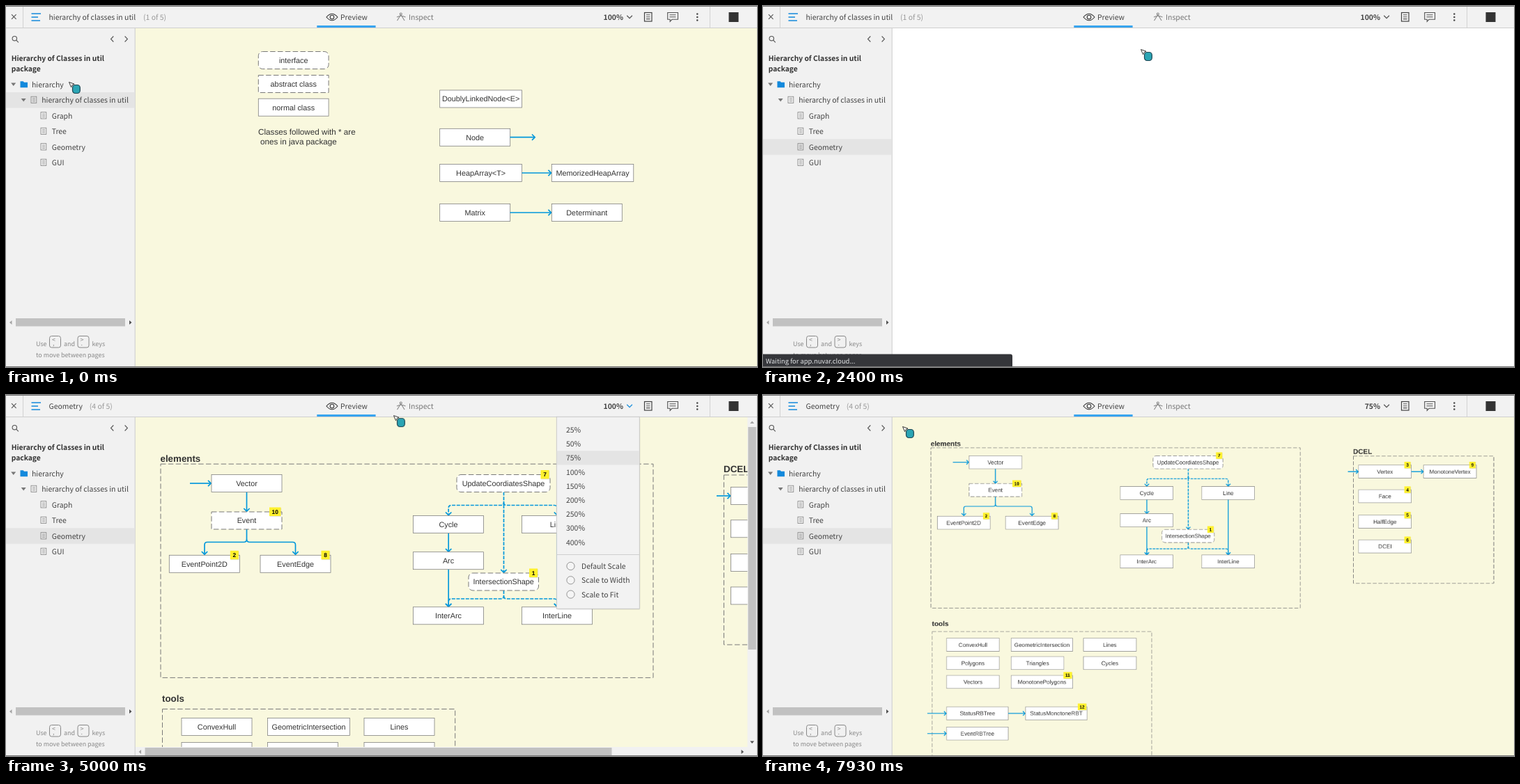
An HTML page for the animation above (8000 ms loop, 1078 px wide and 519 px high).

```html
<!DOCTYPE html>
<html lang="en">
<head>
<meta charset="utf-8">
<title>Class hierarchy viewer</title>
<style>
html, body { margin: 0; width: 100%; height: 100%; overflow: hidden; background: #f2f2f2; }
svg { display: block; width: 1078px; height: 519px; }
text { white-space: pre; text-rendering: geometricPrecision; }
.ui { font: 10.45px "Noto Sans CJK SC", "Noto Sans CJK JP", "Noto Sans CJK", "Open Sans", sans-serif; fill: #444; }
.strong { font-weight: 700; }
.heading { font-size: 10.3px; font-weight: 700; fill: #333; }
.hint { font-size: 8.95px; fill: #888; }
.status { font-size: 9.4px; fill: #e4e6e8; }
.soft { fill: #999; }
.label { font: 10.83px "Liberation Sans", Arial, sans-serif; fill: #333; text-anchor: middle; }
.group { font: bold 13.33px "Liberation Sans", Arial, sans-serif; fill: #333; }
.note { font: 11.7px "Liberation Sans", Arial, sans-serif; fill: #333; }
.count { font: bold 8.4px "Liberation Sans", Arial, sans-serif; text-anchor: middle; }
.icon, .ink { fill: none; stroke: #555; stroke-width: 1.1; }
.flow { fill: none; stroke: #0097db; stroke-width: 1.67; }

/* One loop is 8 s, so 1% is 80 ms. */
.home, .home-title, .geo, .status-bar, .hover, .menu, .pick, .full, .small, .selected, .zoom, .chevron {
  animation: 8s step-end infinite;
}
.home { animation-name: home; }
.home-title { animation-name: home-title; }
.geo { animation-name: geo; }
.status-bar { animation-name: status-bar; }
.hover { animation-name: hover; }
.menu { animation-name: menu; }
.pick { animation-name: pick; }
.full { animation-name: full; }
.small { animation-name: small; }
.selected { animation-name: selected; }
.zoom { animation-name: zoom; }
.chevron { animation-name: chevron; }
.cursor { animation: cursor 8s linear infinite; }

@keyframes home { 0% { opacity: 1 } 23.375%, 100% { opacity: 0 } }
@keyframes home-title { 0% { opacity: 1 } 33.375%, 100% { opacity: 0 } }
@keyframes geo { 0% { opacity: 0 } 33.375%, 100% { opacity: 1 } }
@keyframes status-bar { 0% { opacity: 0 } 25% { opacity: 1 } 35%, 100% { opacity: 0 } }
@keyframes hover { 0% { opacity: 0 } 45% { opacity: 1 } 46.6%, 100% { opacity: 0 } }
@keyframes menu { 0% { opacity: 0 } 46.6% { opacity: 1 } 67.5%, 100% { opacity: 0 } }
@keyframes pick { 0% { opacity: 0 } 62.45%, 100% { opacity: 1 } }
@keyframes full { 0% { opacity: 1 } 67.5%, 100% { opacity: 0 } }
@keyframes small { 0% { opacity: 0 } 67.5%, 100% { opacity: 1 } }
@keyframes selected { 0% { transform: translateY(0) } 23.375%, 100% { transform: translateY(67.4px) } }
@keyframes chevron { 0% { stroke: #555 } 46.6% { stroke: #1b8fdd } 67.5%, 100% { stroke: #555 } }
@keyframes zoom {
  0% { transform: translate(0, 0) scale(1) }
  67.5% { transform: translate(74.5px, 8px) scale(.75) }
  82.45% { transform: translate(74.5px, 4.75px) scale(.75) }
  83.3%, 100% { transform: translate(74.5px, 1.4px) scale(.75) }
}
@keyframes cursor {
  0%, 5% { transform: translate(90px, 109px) }
  7.5% { transform: translate(250px, 112px) }
  10% { transform: translate(480px, 40px) }
  11.25% { transform: translate(569px, 22px) }
  12.5% { transform: translate(530px, 15px) }
  15% { transform: translate(360px, 60px) }
  18% { transform: translate(150px, 112px) }
  20%, 22.5% { transform: translate(78px, 105px) }
  24% { transform: translate(250px, 85px) }
  25.9%, 27.5% { transform: translate(500px, 55px) }
  30%, 40% { transform: translate(542px, 62px) }
  45%, 50.5% { transform: translate(584px, -15.5px) }
  54% { transform: translate(572px, 74px) }
  57% { transform: translate(557px, 56px) }
  59.1%, 62.5% { transform: translate(556px, 29px) }
  68% { transform: translate(575px, 60px) }
  72.5% { transform: translate(582px, 82px) }
  77.5%, 88.7% { transform: translate(589px, 50px) }
  92.5% { transform: translate(450px, 88px) }
  96% { transform: translate(310px, 76px) }
  99%, 100% { transform: translate(200px, 45px) }
}
</style>
</head>
<body>
<svg id="stage" viewBox="0 0 1078 519"></svg>
<script>
const esc = s => String(s).replace(/</g, "&lt;").replace(/>/g, "&gt;");
const rect = (x, y, w, h, fill, more = "") =>
  `<rect x="${x}" y="${y}" width="${w}" height="${h}" fill="${fill}" ${more}/>`;
const path = (d, cls = "icon", more = "") => `<path d="${d}" class="${cls}" ${more}/>`;
const fillPath = (d, fill) => `<path d="${d}" fill="${fill}"/>`;
const text = (x, y, s, cls = "ui", more = "") => `<text x="${x}" y="${y}" class="${cls}" ${more}>${esc(s)}</text>`;
const group = (cls, ...parts) => `<g class="${cls}">${parts.join("")}</g>`;

// Diagram parts
const dashes = 'stroke="#797979" stroke-width="1" stroke-dasharray="7.5 3.33"';
const frame = (x, y, w, h) => rect(x, y, w, h, "none", dashes);
const badge = (right, y, n) => {
  const w = n > 9 ? 16.5 : 12;
  return rect(right - w + .7, y + .8, w, 12.5, "#0002") + rect(right - w, y, w, 12.5, "#fff12e") +
    text(right - w / 2, y + 9.2, n, "count");
};
// kind: "" solid, "a" abstract, "i" interface
const box = (x, y, name, n = 0, w = 101, kind = "") => {
  const line = kind ? dashes + (kind === "i" ? ' rx="6"' : "") : 'stroke="#797979" stroke-width=".75"';
  return rect(x, y, w, 25, "#fff", line) + text(x + w / 2, y + 16.3, name, "label") +
    (n ? badge(x + w - 1.5, y - 6.5, n) : "");
};
const head = (x, y, down) => path(down ? `M${x - 4.2} ${y - 5}L${x} ${y - .8}L${x + 4.2} ${y - 5}`
  : `M${x - 5} ${y - 4.2}L${x - .8} ${y}L${x - 5} ${y + 4.2}`, "flow");
const dashedFlow = 'stroke-dasharray="5 1.67"';
const right = (x, y, end) => path(`M${x} ${y}H${end - 1}`, "flow") + head(end, y, false);
const down = (x, y, end, more = "") => path(`M${x} ${y}V${end - 1}`, "flow", more) + head(x, end, true);
const fork = (x, y, mid, left, far, end, more = "") =>
  path(`M${x} ${y}V${mid - 4}Q${x} ${mid} ${x - 4} ${mid}H${left + 4}Q${left} ${mid} ${left} ${mid + 4}V${end - 1}`, "flow", more) +
  path(`M${x} ${mid - 4}Q${x} ${mid} ${x + 4} ${mid}H${far - 4}Q${far} ${mid} ${far} ${mid + 4}V${end - 1}`, "flow", more) +
  head(left, end, true) + head(far, end, true);

const home = group("home",
  rect(185.5, 32, 893, 487, "#f9f8de"),
  box(362.3, 65.5, "interface", 0, 100.8, "i"),
  box(362.3, 99.5, "abstract class", 0, 100.8, "a"),
  box(362.3, 133.2, "normal class", 0, 100.8),
  text(362, 185, "Classes followed with * are", "note"),
  text(365, 198.7, "ones in java package", "note"),
  box(622.7, 121, "DoublyLinkedNode<E>", 0, 117.8),
  box(622.7, 176.3, "Node"), right(723.5, 188.7, 760),
  box(622.7, 227.4, "HeapArray<T>", 0, 117.8), right(740.5, 240, 783.4),
  box(783.3, 227.4, "MemorizedHeapArray", 0, 117.5),
  box(622.7, 284.6, "Matrix"), right(723.5, 297, 783.4),
  box(783.3, 284.6, "Determinant"));

const elements = [
  frame(222, 99.2, 707, 307.2), text(221.5, 95.7, "elements", "group"),
  right(264, 127, 295), down(345.5, 139.5, 168), fork(345.5, 193, 211.5, 285, 415.5, 230),
  fork(714.5, 139.5, 158.5, 635.2, 791, 173.5, dashedFlow),
  down(714.5, 158, 256, dashedFlow),
  down(635.2, 198.5, 226), down(635.2, 250.5, 305), down(791, 198.5, 305),
  fork(714.5, 281, 293, 635.2, 791, 305, dashedFlow),
  box(295, 114.5, "Vector"), box(295, 168, "Event", 10, 101, "a"),
  box(234.3, 230.3, "EventPoint2D", 2), box(365, 230.3, "EventEdge", 8),
  box(647, 114.5, "UpdateCoordiatesShape", 7, 134, "i"),
  box(584.5, 173.6, "Cycle"), box(740.5, 173.6, "Line"), box(584.5, 225.7, "Arc"),
  box(664, 256, "IntersectionShape", 1, 100.5, "i"),
  box(584.5, 304.8, "InterArc"), box(740.5, 304.8, "InterLine")];

const tools = [
  frame(224.5, 451.5, 420.2, 400), text(224, 441, "tools", "group"),
  box(252, 464.5, "ConvexHull"), box(375.5, 464.5, "GeometricIntersection", 0, 118), box(514, 464.5, "Lines"),
  box(252, 499.6, "Polygons"), box(375.5, 499.6, "Triangles"), box(514, 499.6, "Cycles"),
  box(252, 535.7, "Vectors"), box(375.5, 535.7, "MonotonePolygons", 11, 118),
  right(215, 608.5, 252), box(252, 596, "StatusRBTree", 0, 118),
  right(370, 608.5, 403), box(403, 596, "StatusMonotoneRBT", 12, 118),
  right(215, 647, 252), box(252, 634.5, "EventRBTree", 0, 118)];

const dcel = [
  frame(1030.5, 115, 268.5, 244), text(1030, 111, "DCEL", "group"),
  right(1020, 145, 1040.5), box(1040.5, 132.5, "Vertex", 3),
  right(1141.5, 145, 1165), box(1165, 132.5, "MonotoneVertex", 9),
  box(1040.5, 179.8, "Face", 4), box(1040.5, 228.5, "HalfEdge", 5), box(1040.5, 276, "DCEI", 6)];

const scrollbars = group("full",
  rect(1064.3, 32, 14, 487, "#f1f1f1"), rect(185.5, 506, 893, 13, "#f1f1f1"),
  rect(1065.3, 46, 11.5, 320, "#c1c1c1"), rect(199.5, 507, 670, 11, "#c1c1c1"),
  fillPath("M1068 41h6l-3-3.5z", "#a3a3a3"), fillPath("M1068 497.5h6l-3 3.5z", "#505050"),
  fillPath("M194 510v6l-3.5-3z", "#a3a3a3"), fillPath("M1055.5 510v6l3.5-3z", "#505050"));

const geometry = group("geo", rect(185.5, 32, 893, 487, "#f9f8de"),
  group("zoom", ...elements, ...tools, ...dcel), scrollbars);

// Surroundings
const pageIcon = (x, y) => rect(x, y, 7.8, 9.3, "none", 'stroke="#808080" stroke-width=".8"') +
  path(`M${x + 2} ${y + 2.5}h4m-4 2.2h4m-4 2.2h4`, "icon", 'style="stroke:#808080;stroke-width:.7"');
const triangle = (x, y) => fillPath(`M${x - 3.5} ${y - 2}h7l-3.5 4.5z`, "#777");
const key = (x, a, b) => rect(x, 474.5, 16, 16.5, "none", 'rx="3" stroke="#888"') +
  text(x + 3.5, 483, a, "ui hint") + text(x + 4.5, 488, b, "ui hint");

const rows = ["Graph", "Tree", "Geometry", "GUI"].map((name, i) =>
  pageIcon(50, 152.7 + 22.5 * i) + text(65.7, 161.7 + 22.5 * i, name)).join("");

const sidebar = [
  rect(0, 32, 185, 487, "#f1f1f1"), rect(184.7, 32, 1, 487, "#cacaca"),
  rect(0, 124, 184.7, 22.5, "#e4e4e4", 'class="selected"'),
  '<circle cx="12.3" cy="46.7" r="3.2" class="ink"/>', path("M14.7 49.1l3.2 3.2"),
  path("M154.3 43.5l-3.8 4l3.8 4M170.6 43.5l3.8 4l-3.8 4"),
  text(7.7, 79, "Hierarchy of Classes in util", "ui heading"), text(7.7, 94.3, "package", "ui heading"),
  triangle(10.7, 112.5), fillPath("M20.5 108.3h4.2l1.3 1.5h5v7.4h-10.5z", "#1389dc"), text(37, 116.7, "hierarchy"),
  triangle(25.2, 135), pageIcon(36, 130.2), text(51.2, 139.2, "hierarchy of classes in util"), rows,
  rect(14, 449, 157, 11.5, "#c1c1c1"),
  fillPath("M8.5 452v6l-3.5-3z", "#a3a3a3"), fillPath("M177 452v6l3.5-3z", "#505050"),
  text(43, 488.5, "Use", "ui hint"), key(62.5, "<", ","), text(83, 488.5, "and", "ui hint"),
  key(103, ">", "."), text(123.5, 488.5, "keys", "ui hint"),
  text(43, 505.3, "to move between pages", "ui hint")].join("");

const topbar = [
  rect(0, 0, 1078, 32, "#f2f2f2"), rect(0, 31, 1078, 1, "#cfcfcf"),
  rect(24, 1, 1, 30, "#d2d2d2"), rect(1010, 1, 1, 30, "#d2d2d2"),
  path("M8 12.2l6.6 6.6M14.6 12.2l-6.6 6.6"),
  path("M36.5 11h13.5M36.5 16h9.5M36.5 21h12.5", "icon", 'style="stroke:#1389dc;stroke-width:1.6"'),
  group("home-title", text(61.5, 20, "hierarchy of classes in util"), text(197, 20, "(1 of 5)", "ui soft")),
  group("geo", text(61.5, 20, "Geometry"), text(119.8, 20, "(4 of 5)", "ui soft")),
  rect(446.3, 28, 84.3, 3, "#38a4ee"),
  path("M460 16Q468 6.5 476 16Q468 25.5 460 16z", "icon", 'style="stroke:#333"'),
  '<circle cx="468" cy="16" r="2.8" class="ink" style="stroke:#333"/>', text(480, 20, "Preview"),
  path("M561.5 21l5.3-8.5l5.3 8.5M561 16q6-3.5 12.5 0", "icon", 'style="stroke:#888"'),
  '<circle cx="566.8" cy="11.5" r="1.5" class="ink" style="stroke:#888"/>',
  text(578, 20, "Inspect", "ui", 'style="fill:#777"'),
  rect(852, 4, 51.5, 23.5, "#e3e3e3", 'class="hover"'),
  group("full", text(886, 20, "100%", "ui strong", 'text-anchor="end"')),
  group("small", text(886, 20, "75%", "ui strong", 'text-anchor="end"')),
  '<path d="M891.3 13.8l3.8 3.8l3.8-3.8" class="chevron" fill="none" stroke="#555" stroke-width="1.3"/>',
  rect(916.5, 9.5, 10.5, 12.5, "none", 'stroke="#444" stroke-width="1.2"'),
  path("M919 12.8h5.5m-5.5 2.9h5.5m-5.5 2.9h5.5"),
  path("M949.7 9.5h14.8v9.8h-8.5l-2.8 3v-3h-3.5zM952.5 12.8h9m-9 3h9"),
  [11.5, 16, 20.5].map(y => `<circle cx="992.3" cy="${y}" r="1.25" fill="#444"/>`).join(""),
  rect(1037.5, 9, 14, 14, "#333")].join("");

const levels = [25, 50, 75, 100, 150, 200, 250, 300, 400];
const scales = ["Default Scale", "Scale to Width", "Scale to Fit"];
const menu = group("menu",
  rect(791, 33, 119.5, 276, "#0001", 'rx="2"'),
  rect(790.3, 31.3, 119, 276, "#f2f2f2", 'stroke="#c4c4c4" stroke-width=".9"'),
  rect(790.8, 80.3, 118, 20.2, "#e4e4e4", 'class="pick"'),
  ...levels.map((n, i) => text(804, 54 + 20.2 * i, n + "%")),
  rect(790.5, 229, 118.5, 1, "#cfcfcf"),
  ...scales.map((s, i) => `<circle cx="810.5" cy="${246 + 20.3 * i}" r="5.6" fill="#f5f5f5" stroke="#888" stroke-width=".9"/>` +
    text(826, 250 + 20.3 * i, s)));

const statusBar = group("status-bar",
  fillPath("M0 500.5H355q3 0 3 3V519H0z", "#35363a"),
  text(4, 513.5, "Waiting for app.nuvar.cloud...", "ui status"));

const cursor = group("cursor",
  rect(5.5, 4.5, 10.8, 12, "#2ba5b4", 'rx="4" stroke="#1f4552" stroke-width="1.2"'),
  '<path d="M.5 .5L8 3.2L5 4.7L3.6 7.8z" fill="#fff" stroke="#333" stroke-width="1"/>');

document.getElementById("stage").innerHTML = [
  rect(0, 0, 1078, 519, "#fff"), home, geometry, sidebar, topbar, menu, statusBar,
  rect(0, 0, 1078, 1, "#777"), rect(0, 518, 1078, 1, "#777"), cursor].join("");
</script>
</body>
</html>
```
